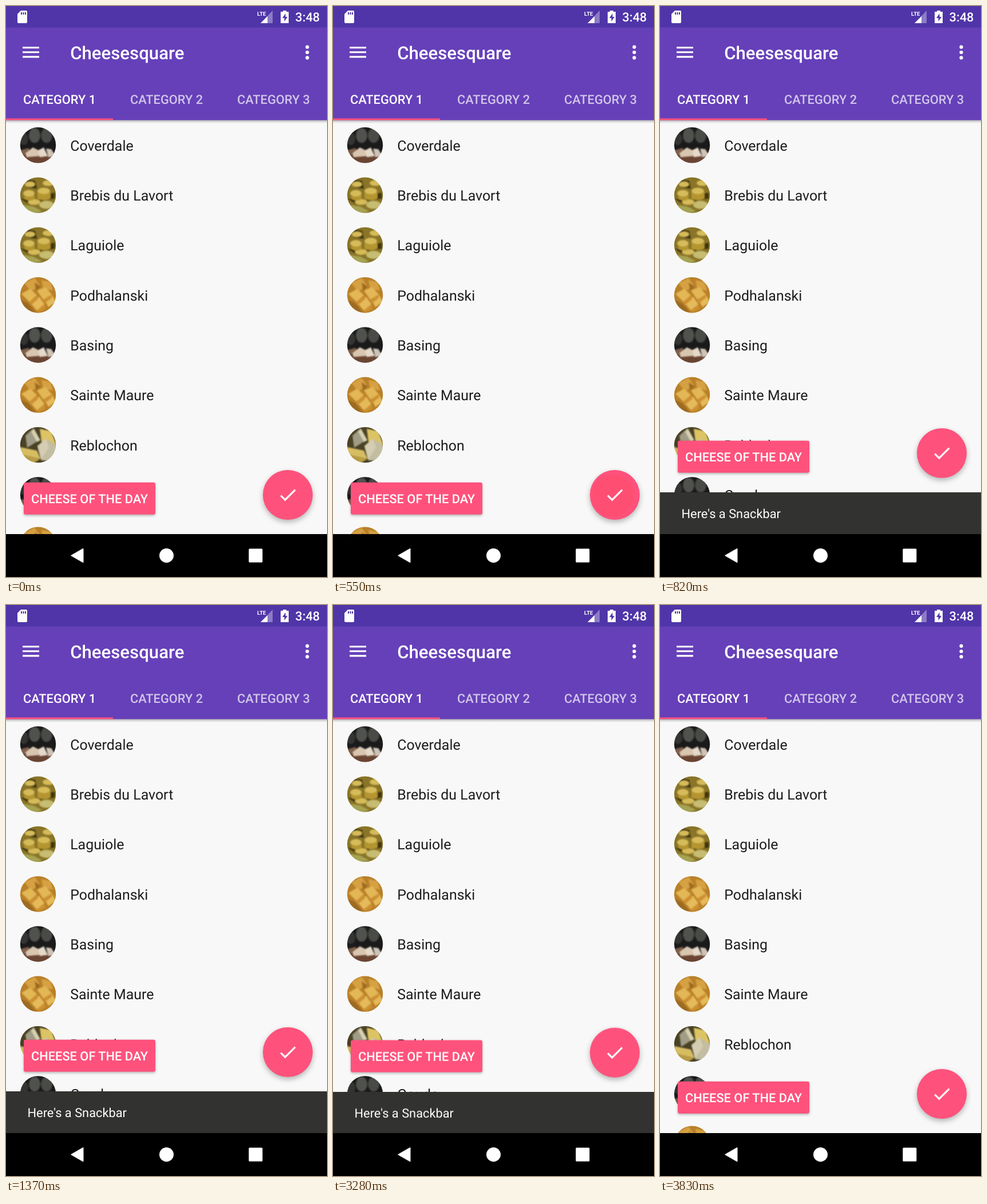
These frames come from a looping animation (561x998 px, 4.11 s). An HTML page:

```html
<!DOCTYPE html>
<html lang="en">
<head>
<meta charset="utf-8">
<title>Cheese list</title>
<style>
  html, body { margin: 0; width: 100%; height: 100%; overflow: hidden; background: #f8f8f8; }
  svg { display: block; width: 561px; height: 998px; }
  text { font-family: Roboto, "Noto Sans", sans-serif; white-space: pre; text-rendering: geometricPrecision; }
  .title { font-size: 31.17px; font-weight: 500; fill: #fff; }
  .label { font-size: 21.82px; font-weight: 500; fill: #fff; text-anchor: middle; }
  .dim { fill-opacity: .7; }
  .item { font-size: 24.93px; fill: #1d1d1f; }
  .note { font-size: 21.82px; fill: #fff; }
  .photo { filter: blur(.8px); }
  .raised { filter: drop-shadow(0 2px 2px rgba(0, 0, 0, .28)); }
  .floating { filter: drop-shadow(0 4px 5px rgba(0, 0, 0, .28)); }
  #lift { animation: lift 4110ms step-end infinite; }
  #ripple { opacity: 0; animation: ripple 4110ms step-end infinite; }
  @keyframes lift {
    0% { transform: translateY(73px); }
    19.951% { transform: translateY(0); }
    79.805% { transform: translateY(.8px); }
    86.375% { transform: translateY(4px); }
    93.187%, 100% { transform: translateY(73px); }
  }
  @keyframes ripple {
    0% { opacity: 0; }
    13.382% { opacity: .35; }
    19.951%, 100% { opacity: 0; }
  }
</style>
</head>
<body>
<svg viewBox="0 0 561 998">
  <defs>
    <clipPath id="disc"><circle cx="31" cy="31" r="31.2"/></clipPath>
    <linearGradient id="shade" x2="0" y2="1">
      <stop stop-color="#000" stop-opacity=".28"/>
      <stop offset="1" stop-color="#000" stop-opacity="0"/>
    </linearGradient>

    <g id="cellar">
      <path fill="#1b1a1b" d="M-3-3h68v68H-3z"/>
      <ellipse cx="25" cy="14" rx="10" ry="13" fill="#50524e"/>
      <ellipse cx="46" cy="14" rx="10" ry="13" fill="#494b47"/>
      <ellipse cx="6" cy="20" rx="8" ry="11" fill="#343533"/>
      <path fill="#6b4534" d="M-3 48h68v17H-3z"/>
      <path fill="#80604a" d="M0 40l14-4 6 8-18 6z"/>
      <path fill="#d8c6b0" d="M9 45l13-10 10 5 2 10-23 2z"/>
      <path fill="#e5d9c9" d="M31 40l10-5 7 15-14 2z"/>
      <path fill="#cfc3b6" d="M45 37l9 1 8 12-13 2z"/>
    </g>

    <g id="rounds">
      <path fill="#897427" d="M-3-3h68v68H-3z"/>
      <path fill="#40350f" d="M8 3l18 3 3 14-17-3zM30 31l30-4v10l-25 4zM0 37l20 3-4 7z"/>
      <g fill="#d6bb5a">
        <ellipse cx="17" cy="12" rx="9" ry="5"/>
        <ellipse cx="41" cy="24" rx="11" ry="6"/>
        <ellipse cx="15" cy="28" rx="10" ry="6"/>
        <ellipse cx="24" cy="43" rx="11" ry="5"/>
        <ellipse cx="49" cy="10" rx="10" ry="5"/>
      </g>
      <path fill="#b4952f" d="M30 26q12 7 23 0v11q-12 6-23 0zM7 31q9 6 18 0v7q-9 5-18 0z"/>
      <ellipse cx="46" cy="48" rx="13" ry="7" fill="#c7bd72"/>
      <path fill="#a6a353" d="M4 48l19 3 15 8-9 3H10z"/>
    </g>

    <g id="cubes">
      <path fill="#b98028" d="M-3-3h68v68H-3z"/>
      <path fill="#d6a143" d="M7 10l18-9 9 13-15 11zM37 5l16 3 4 15-17-3z"/>
      <path fill="#e3b755" d="M2 29l15-9 12 11-13 12zM29 23l15-6 11 13-15 9z"/>
      <path fill="#e5ba5a" d="M17 44l16-10 9 13-13 11zM42 38l13-8 7 13-13 9z"/>
      <path fill="#cc9032" d="M16 43l13-12 2 7-14 12zM40 39l15-9v6l-13 10zM29 58l13-11 2 8-13 7z"/>
      <path fill="#9d6a22" d="M0 39l15 7 12 16H12zM25 9l10 7-7 8z"/>
    </g>

    <g id="wedges">
      <path fill="#4a4225" d="M-3-3h68v68H-3z"/>
      <path fill="#dcc364" d="M34 3l20 4 9 24-26-5z"/>
      <path fill="#a19c86" d="M9 15l14-13 11 20-22 14z"/>
      <path fill="#d7d0b1" d="M19 8l5-5 11 20-6 3z"/>
      <path fill="#c3bda2" d="M30 33l15-13 18 12v28l-26-2z"/>
      <path fill="#d5cdb2" d="M30 33l15-13 5 16-14 21z"/>
      <path fill="#d7bd62" d="M0 35l29 6 6 14-20 7L0 49z"/>
      <path fill="#b79b46" d="M0 47l35 8-12 9H8z"/>
    </g>
  </defs>

  <path fill="#f8f8f8" d="M0 0h561v998H0z"/>
  <g id="list"></g>

  <path fill="url(#shade)" d="M0 199h561v6H0z"/>
  <path fill="#6640b9" d="M0 37h561v162.500H0z"/>
  <path fill="#4f35a8" d="M0 0h561v37.500H0z"/>
  <path fill="#fe527c" d="M0 196.400h187v3.100H0z"/>

  <!-- status bar -->
  <path fill="#fff" d="M26 8h9q2 0 2 2v18q0 2-2 2H22q-2 0-2-2V14z"/>
  <path stroke="#4f35a8" stroke-width="2" d="M27 11v4M30.500 11v4M34 11v4"/>
  <text x="439" y="16.500" font-size="9.500" font-weight="700" fill="#fff">LTE</text>
  <path fill="#fff" fill-opacity=".35" d="M466 8v22h-21z"/>
  <path fill="#fff" d="M457 18v12h-12z"/>
  <path fill="#fff" d="M484 8h6v2h4v20h-14V10h4z"/>
  <path fill="#4f35a8" d="M488.500 13l-5.500 8h3.500v6l5.500-8h-3.500z"/>
  <text class="label" x="527" y="27.300">3:48</text>

  <!-- toolbar -->
  <path stroke="#fff" stroke-width="3.100" d="M29 72.700h29M29 80.800h29M29 88.900h29"/>
  <text class="title" x="112.200" y="93">Cheesesquare</text>
  <g fill="#fff">
    <circle cx="526.500" cy="71.700" r="3.100"/>
    <circle cx="526.500" cy="81" r="3.100"/>
    <circle cx="526.500" cy="90.400" r="3.100"/>
  </g>
  <text class="label" x="93.500" y="170.800">CATEGORY 1</text>
  <text class="label dim" x="280.500" y="170.800">CATEGORY 2</text>
  <text class="label dim" x="467.500" y="170.800">CATEGORY 3</text>

  <!-- snackbar with the buttons riding on it -->
  <g id="lift">
    <path fill="#323230" d="M0 850h561v74H0z"/>
    <text class="note" x="37.500" y="895.300">Here's a Snackbar</text>
    <rect class="raised" x="31" y="759.800" width="230" height="56" rx="3" fill="#fe527c"/>
    <text class="label" x="146" y="796.200">CHEESE OF THE DAY</text>
    <circle class="floating" cx="492.500" cy="781.500" r="43.600" fill="#fe527c"/>
    <circle id="ripple" cx="489" cy="783" r="37" fill="#ff4a64"/>
    <path fill="none" stroke="#fff" stroke-width="3.100" d="M480.200 782.600l7.600 7.600 17.600-17.600"/>
  </g>

  <!-- navigation bar -->
  <path d="M0 923h561v75H0z"/>
  <g fill="#fff">
    <path stroke="#fff" stroke-width="2" stroke-linejoin="round" d="M114.500 960.500L134.500 949v23z"/>
    <circle cx="280.500" cy="960.500" r="12.500"/>
    <rect x="424.300" y="948.500" width="24" height="24" rx="1.500"/>
  </g>
</svg>
<script>
  const rows = [
    ["Coverdale", "cellar"], ["Brebis du Lavort", "rounds"], ["Laguiole", "rounds"],
    ["Podhalanski", "cubes"], ["Basing", "cellar"], ["Sainte Maure", "cubes"],
    ["Reblochon", "wedges"], ["Gouda", "cellar"], ["", "cubes"]
  ];
  const rowHeight = 87.3;
  document.getElementById("list").innerHTML = rows.map(([name, photo], i) =>
    `<g transform="translate(0 ${i * rowHeight})">
      <g transform="translate(25 212.3)" clip-path="url(#disc)"><use class="photo" href="#${photo}"/></g>
      <text class="item" x="112.200" y="252.900">${name}</text>
    </g>`).join("");
</script>
</body>
</html>
```
